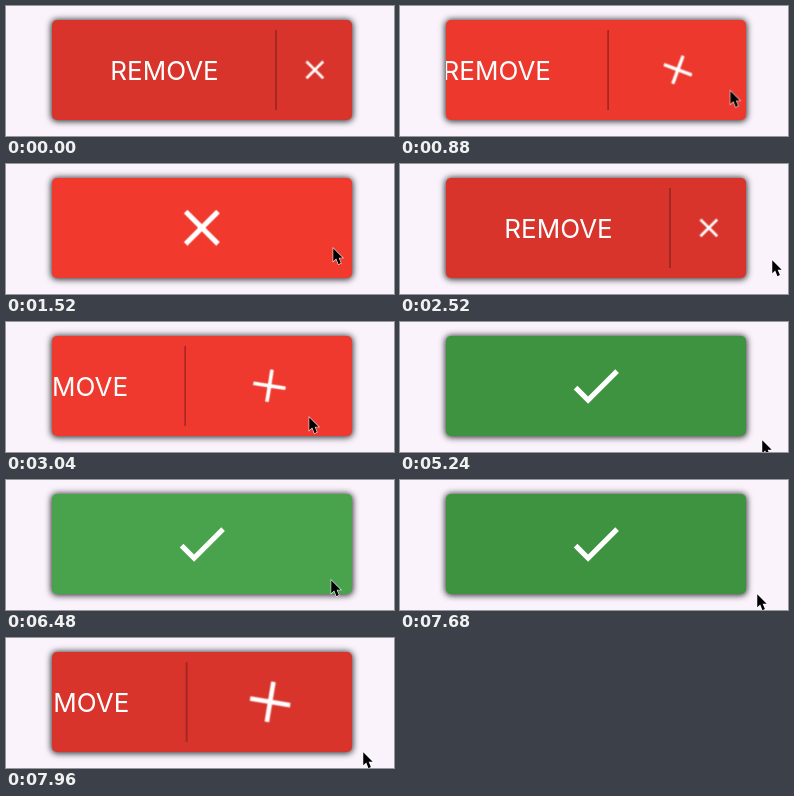
Animation, 388 px wide and 130 px high, one loop 8000 ms. Source, as an HTML page:

```html
<!DOCTYPE html>
<html lang="en">
<head>
<meta charset="utf-8">
<title>Remove button</title>
<style>
  :root {
    --red: #d8342b;
    --red-hover: #f1392e;
    --green: #3d9340;
    --green-hover: #48a34c;
  }
  html, body {
    margin: 0;
    width: 100%;
    height: 100%;
    overflow: hidden;
    background: #faf3fc;
  }
  .stage { position: relative; width: 388px; height: 130px; overflow: hidden; }
  .stage * { animation: 8s ease-in-out infinite; }

  .button {
    position: absolute;
    left: 46px; top: 13.5px;
    width: 300px; height: 100.5px;
    border-radius: 5px;
    overflow: hidden;
    box-shadow: 0 .5px 6px 1px rgba(0, 0, 0, .8);
    animation-name: tint !important;
  }
  .label {
    position: absolute;
    inset: 0 auto 0 0;
    width: 225px;
    font: 400 26px/102px Inter, Arial, sans-serif;
    text-align: center;
    color: #fff;
    animation-name: slide !important;
  }
  .label::after {
    content: "";
    position: absolute;
    left: 223px; top: 10.5px;
    width: 2px; height: 80px;
    background: #a32823;
  }
  .icon {
    position: absolute;
    left: 119.2px; top: 19.7px;
    width: 61.6px; height: 61.6px;
    fill: #fff;
  }
  .close { animation-name: close !important; }
  .check { animation-name: check !important; }
  .cursor {
    position: absolute;
    left: -2px; top: -2px;
    width: 14.4px; height: 20.7px;
    animation-name: point !important;
  }

  @keyframes tint {
    0%, 8.75% { background: var(--red); }
    12%, 24.5% { background: var(--red-hover); }
    27.75%, 35.25% { background: var(--red); }
    38.5%, 44% { background: var(--red-hover); }
    46.75%, 61.75% { background: var(--green-hover); }
    65%, 73.5% { background: var(--green); }
    76.5%, 83% { background: var(--green-hover); }
    85%, 96% { background: var(--green); }
    98.5%, 100% { background: var(--red); }
  }
  /* The last slide back is an ease-in-out that the loop cuts off at 64% of its time. */
  @keyframes slide {
    0%, 8.75% { translate: 0; }
    15%, 24.5% { translate: -226px; }
    30.75%, 35.25% { translate: 0; }
    41.5% { translate: -226px; }
    96% { translate: -226px; animation-timing-function: cubic-bezier(.43, 0, .69, .59); }
    100% { translate: -61px; }
  }
  @keyframes close {
    0%, 8.75% { translate: 113px; rotate: 0deg; scale: .52; }
    15%, 24.5% { translate: 0; rotate: -90deg; scale: 1; }
    30.75%, 35.25% { translate: 113px; rotate: 0deg; scale: .52; }
    41.5%, 44% { translate: 0; rotate: -90deg; scale: 1; }
    50.25%, 95.99% { translate: 0; rotate: -270deg; scale: 1; }
    96% { translate: 0; rotate: -90deg; scale: 1; animation-timing-function: cubic-bezier(.43, 0, .69, .59); }
    100% { translate: 82.5px; rotate: -24.3deg; scale: .865; }
  }
  @keyframes fade {
    0%, 44% { opacity: 1; }
    50.25%, 96% { opacity: 0; }
    97.5%, 100% { opacity: 1; }
  }
  .close path { animation-name: fade !important; }
  @keyframes check {
    0%, 44% { rotate: 180deg; opacity: 0; }
    50.25%, 96% { rotate: 0deg; opacity: 1; }
    97.5%, 100% { rotate: 0deg; opacity: 0; }
  }
  @keyframes point {
    0% { translate: 392px 97px; }
    6.5% { translate: 390px 97px; animation-timing-function: cubic-bezier(.2, .2, .4, 1); }
    12.5%, 22% { translate: 327px 84px; }
    28%, 32.5% { translate: 372px 96px; }
    38.75%, 57.5% { translate: 301px 95px; }
    63.75%, 72% { translate: 362px 118px; }
    77%, 81% { translate: 325px 100px; }
    85%, 100% { translate: 357px 114px; }
  }
</style>
</head>
<body>
<div class="stage">
  <div class="button">
    <div class="label">REMOVE</div>
    <svg class="icon close" viewBox="0 0 24 24">
      <path d="M19 6.41 17.59 5 12 10.59 6.41 5 5 6.41 10.59 12 5 17.59 6.41 19 12 13.41 17.59 19 19 17.59 13.41 12z"/>
    </svg>
    <svg class="icon check" viewBox="0 0 24 24">
      <path d="M9 16.17 4.83 12 3.41 13.41 9 19 21 7 19.59 5.59z"/>
    </svg>
  </div>
  <svg class="cursor" viewBox="-2 -2 16 23">
    <path d="M.5 .5V15L3.8 12 6.3 18.2 9 17 6.5 11H11z" fill="#000" stroke="#fff" stroke-width="1.2" paint-order="stroke"/>
  </svg>
</div>
</body>
</html>
```
